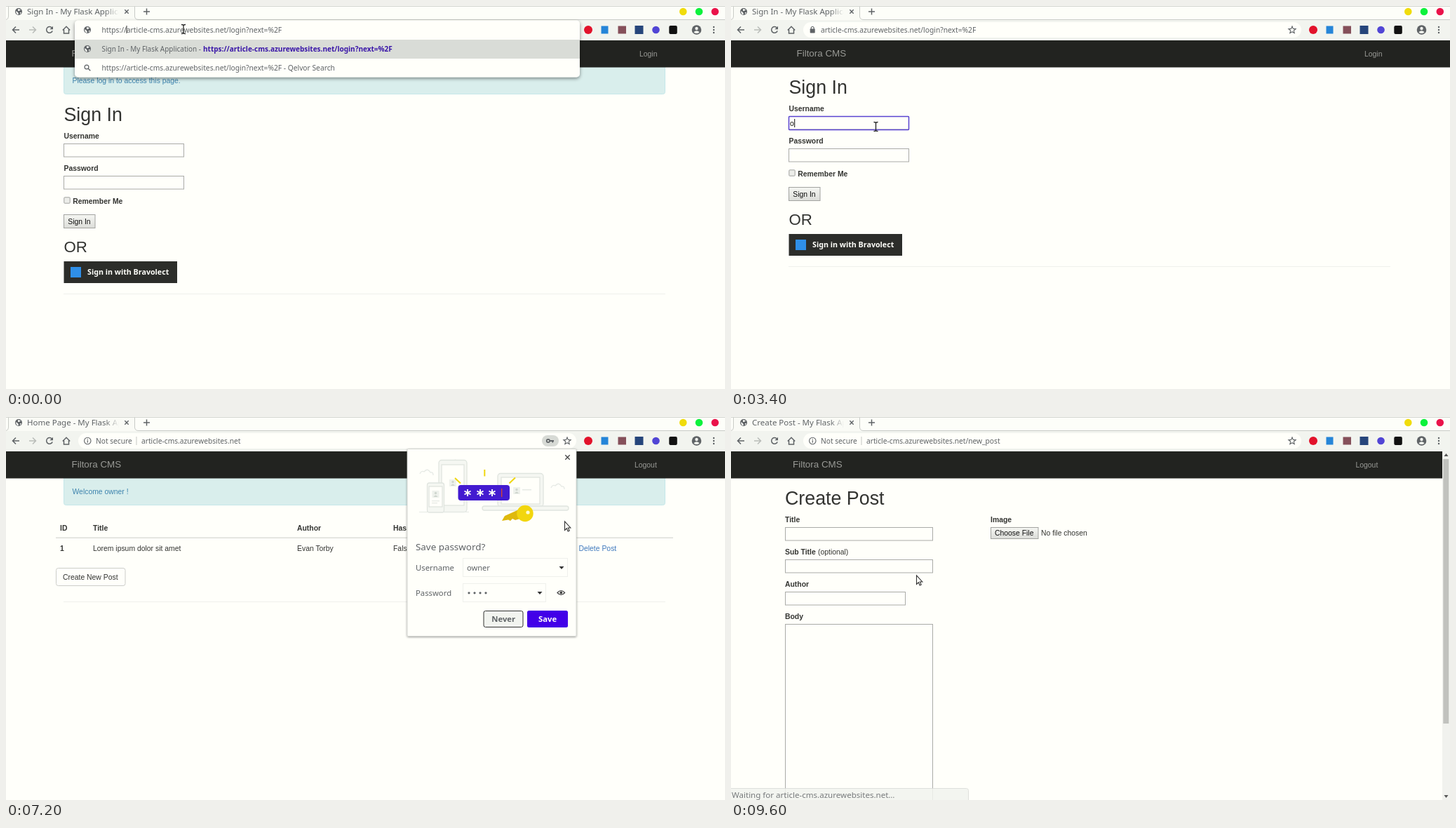
An HTML page for the animation above (9.8 s loop, 1025x546 px).

```html
<!DOCTYPE html>
<html lang="en">
<head>
<meta charset="utf-8">
<title>Browser walkthrough</title>
<style>
  html, body { margin: 0; width: 100%; height: 100%; overflow: hidden; background: #fffffa; }
  svg { display: block; width: 1025px; height: 546px; }
  text { white-space: pre; }
  .page { font-family: "Liberation Sans", Arial, sans-serif; }
  .ui { font-family: "Noto Sans", "Open Sans", sans-serif; }
</style>
</head>
<body>
<svg id="stage" viewBox="0 0 1025 546" xmlns="http://www.w3.org/2000/svg">
  <defs>
    <linearGradient id="fade"><stop offset="0" stop-color="#fafbf6" stop-opacity="0"/><stop offset="1" stop-color="#fafbf6"/></linearGradient>
    <linearGradient id="button" x2="0" y2="1"><stop offset="0" stop-color="#f5f6f2"/><stop offset="1" stop-color="#dcddd9"/></linearGradient>
    <clipPath id="tabClip"><rect x="28" width="133" height="19"/></clipPath>
    <filter id="shadow" x="-10%" y="-10%" width="120%" height="130%"><feDropShadow dx="0" dy="1" stdDeviation="1.8" flood-opacity=".4"/></filter>
    <filter id="deepShadow" x="-10%" y="-20%" width="120%" height="150%"><feDropShadow dx="0" dy="2" stdDeviation="2.8" flood-opacity=".45"/></filter>
  </defs>
  <g id="scene"></g>
</svg>
<script>
const LOOP = 9800, STEP = 200;
const PAPER = '#fffffa', INK = '#333431', GREY = '#5f6366', LINK = '#3f79bd';
const HOST = 'article-cms.azurewebsites.net';
const LOGIN = HOST + '/login?next=%2F';
const BRAND = 'Filtora CMS', USER = 'owner';
const scene = document.getElementById('scene');

const text = (x, y, s, size = 10.4, fill = INK, more = '') =>
  `<text class="page" x="${x}" y="${y}" font-size="${size}" fill="${fill}" ${more}>${s}</text>`;
const bold = (x, y, s) => text(x, y, s, 10.4, INK, 'font-weight="700"');
const ui = (x, y, s, size = 10.2, fill = GREY, more = '') =>
  `<text class="ui" x="${x}" y="${y}" font-size="${size}" fill="${fill}" ${more}>${s}</text>`;
const rect = (x, y, w, h, fill, more = '') =>
  `<rect x="${x}" y="${y}" width="${w}" height="${h}" fill="${fill}" ${more}/>`;
const circle = (x, y, r, fill, more = '') => `<circle cx="${x}" cy="${y}" r="${r}" fill="${fill}" ${more}/>`;
const stroke = (d, color = GREY, w = 1.4, more = '') =>
  `<path d="${d}" fill="none" stroke="${color}" stroke-width="${w}" ${more}/>`;
const fill = (d, color) => `<path d="${d}" fill="${color}"/>`;
const at = (x, y, s) => `<g transform="translate(${x} ${y})">${s}</g>`;
const when = (test, make) => test ? make() : '';

const cross = (x, y, r, color = GREY, w = 1.4) =>
  stroke(`M${x - r} ${y - r}l${2 * r} ${2 * r}m0 ${-2 * r}l${-2 * r} ${2 * r}`, color, w);
const globe = (x, y) => at(x, y, circle(0, 0, 5, GREY) +
  fill('M-4 -1L-1 1L0 4L-2 4Q-4 2 -4 -1ZM-1 -4L3 -3L1 -1L-1 -1ZM2 1L4 1L2 4Z', '#f4f5f1'));
const keyIcon = (x, y) => at(x, y, circle(-2.6, 0, 2.2, 'none', `stroke="${GREY}" stroke-width="1.7"`) +
  stroke('M0 0H5.5M3.8 0V2.6', GREY, 1.8));
const dropArrow = (x, y) => fill(`M${x - 3.5} ${y - 2}h7l-3.5 4z`, '#333');

const input = (x, y, w, h = 19.5) => rect(x + .5, y + .5, w - 1, h - 1, PAPER, 'stroke="#aaaba8"');
const focusRing = y => rect(82.5, y + .5, 171, 19, 'none', 'rx="1" stroke="#5a43d0" stroke-width="1.5"');
const button = (x, y, w, h, label, labelX) =>
  rect(x + .5, y + .5, w - 1, h - 1, 'url(#button)', 'stroke="#a2a3a0"') + text(labelX, y + h / 2 + 3.7, label, 10.4, '#111');
const rule = y => rect(82, y, 858, 1, '#eff0ec');
const caret = (x, y, h = 12) => rect(x, y, 1, h, '#111');

function track(t, keys) {
  let i = 0;
  while (i < keys.length - 2 && t >= keys[i + 1][0]) i++;
  const [a, b] = [keys[i], keys[i + 1]];
  const p = Math.min(1, Math.max(0, (t - a[0]) / (b[0] - a[0])));
  const e = p * p * (3 - 2 * p);
  return [a[1] + (b[1] - a[1]) * e, a[2] + (b[2] - a[2]) * e];
}
const pointerPath = [
  [0, 253, 33], [1400, 253, 33], [2000, 319, 303], [2600, 343, 332], [3000, 206.5, 172], [5000, 206.5, 172],
  [5600, 206, 278], [6400, 206, 278], [7200, 796, 149], [7600, 800, 57], [7800, 800, 57],
  [8400, 140, 226], [8800, 140, 226], [9200, 179, 224], [9600, 264, 226]
];

function pointer(t) {
  const [x, y] = track(t, pointerPath);
  if (t < 1600 || (t >= 3000 && t < 5400))
    return at(x, y, stroke('M-3 -6.5Q0 -6.5 0 -5Q0 -6.5 3 -6.5M0 -5V5M-3 6.5Q0 6.5 0 5Q0 6.5 3 6.5', '#222', 1.3));
  if (t >= 8400 && t < 9400)
    return at(x, y, '<path d="M-1 1Q0 -1 1.2 1V6L6 7Q8 8 7 11L5.5 15H0L-4 9Q-4 7 -1 9Z" fill="#fffffa" stroke="#222" stroke-width="1.1"/>' +
      stroke('M2.5 8V10M4.8 8V10', '#222', .8));
  return at(x, y, '<path d="M.5 0V12.5L3.3 9.8L5.2 14L7.2 13L5.3 9H8.8Z" fill="#fffffa" stroke="#333" stroke-width="1.1"/>');
}

function navbar(action, x, shift = 0) {
  return rect(0, 49, 1025, 38.5, '#222320') + text(93.5 + shift, 72, BRAND, 13.4, '#999a96') +
    text(x + shift, 71.6, action, 10.4, '#999a96');
}

const alertBox = message => rect(82.5, 70, 857, 55.5, '#d9eeec', 'rx="3" stroke="#c5e7e9"') + text(94.5, 110, message, 10.4, '#3d83ad');

function signInPage(t) {
  const withAlert = t < 1200;
  const name = USER.slice(0, [3400, 3600, 3600, 3800, 3800].filter(k => t >= k).length);
  const dots = t >= 4600 ? 4 : t >= 4400 ? 2 : 0;
  const form = text(82.5, 125.3, 'Sign In', 26.8) +
    bold(82.5, 149.7, 'Username') + input(82, 157, 172) + text(84, 171, name, 10.4, '#111') +
    bold(82.5, 195.6, 'Password') + input(82, 203, 172) +
    Array.from({ length: dots }, (_, i) => circle(86 + i * 3.8, 213, 1.45, '#111')).join('') +
    when(t >= 3000 && t < 4000, () => focusRing(157) + caret(84.5 + name.length * 5.7, 161)) +
    when(t >= 4000, () => focusRing(203) + caret(85 + dots * 3.7, 207)) +
    rect(82.8, 233.8, 8.4, 8.4, '#ecede9', 'rx="1" stroke="#a2a3a0"') + bold(95.3, 242.8, 'Remember Me') +
    button(82, 258, 45.5, 20, 'Sign In', 88.3) + text(82.5, 312.4, 'OR', 22.3) +
    rect(82.5, 325, 161.5, 31, '#2c2d2a') + rect(92, 333, 15, 15, '#2f8fe8') +
    ui(116, 344.3, 'Sign in with Bravolect', 10.7, '#fffffa', 'font-weight="600"') + rule(371);
  return (withAlert ? alertBox('Please log in to access this page.') + at(0, 39, form) : form) + navbar('Login', 903);
}

function homePage(t) {
  const hover = t >= 8400;
  return alertBox(`Welcome ${USER} !`) + navbar('Logout', 896) +
    bold(77, 161.8, 'ID') + bold(124, 161.8, 'Title') + bold(415, 161.8, 'Author') + bold(552, 161.8, 'Has Image?') +
    rect(71, 171.5, 880, 1.5, '#dddeda') +
    bold(77, 190.5, '1') + text(124, 190.5, 'Lorem ipsum dolor sit amet') + text(415, 190.5, 'Evan Torby') +
    text(552, 190.5, 'False') + text(701, 190.5, 'Edit Post', 10.4, LINK) + text(816.5, 190.5, 'Delete Post', 10.4, LINK) +
    rect(71.5, 215.5, 98.5, 25, hover ? '#e6e7e3' : PAPER, `rx="3" stroke="${hover ? '#adaeaa' : '#cccdc9'}"`) +
    text(81, 231.8, 'Create New Post') + rule(263);
}

function createPage() {
  return navbar('Logout', 896, -5.5) + text(77, 125.3, 'Create Post', 26.8) +
    bold(77, 149.7, 'Title') + input(77, 157, 211) +
    bold(77, 195.6, 'Sub Title') + text(124, 195.6, '(optional)') + input(77, 203, 211) +
    bold(77, 241.6, 'Author') + input(77, 249, 172) + bold(77, 287.6, 'Body') + input(77, 295, 211, 260) +
    bold(370, 149.7, 'Image') + button(370, 157, 68.5, 17, 'Choose File', 376) + text(442, 169.3, 'No file chosen') +
    rect(1014, 49, 11, 497, '#f1f2ee') + rect(1015.3, 60, 8, 377, '#c1c2be') +
    fill('M1016.5 56h6l-3-4zM1016.5 539h6l-3 4z', '#555');
}

function illustration() {
  const pale = '#e6eae5', line = 'stroke="#e0e5df" stroke-width="1.3"';
  const cloud = (x, y) => stroke(`M${x} ${y}q2 -5 6 -3q5 -6 9 1q4 -1 4 4`, pale, 1.3);
  const person = (x, y) => rect(x - 5, y - 5, 10, 10, '#eef1ec') + circle(x, y - 1.5, 1.7, '#cfd6ce') +
    fill(`M${x - 3} ${y + 4}q3 -5 6 0z`, '#cfd6ce');
  const star = x => stroke(`M${x} 103v10M${x - 4.5} 105.5l9 5m0 -5l-9 5`, '#fffffa', 1.9);
  return cloud(590, 81) + cloud(630, 67) + cloud(777, 101) +
    rect(617, 61.5, 40, 74, '#f5f7f2', `rx="4" ${line}`) + rect(621, 68, 32, 58, PAPER, line) +
    rect(600.5, 94, 24, 42, '#f5f7f2', `rx="3" ${line}`) + rect(603, 99, 19, 29, PAPER, line) +
    person(612.5, 110) + person(637, 94) + rect(607, 119, 11, 1.3, pale) + rect(607, 122, 8, 1.3, pale) +
    rect(701, 80.5, 65, 47, '#f5f7f2', `rx="4" ${line}`) + rect(706, 86, 55, 38, PAPER, line) +
    person(728, 105) + rect(736, 103, 13, 1.5, pale) + rect(679, 127, 123, 6, '#f5f7f2', `rx="3" ${line}`) +
    stroke('M589 135.5H660', pale, 1) +
    stroke('M640 87l8 7.5M682.3 75v9.5M726 86.5l-8.5 8', '#f0d70f', 2) +
    rect(644.5, 97, 73.5, 22, '#431bd0', 'rx="4"') + star(658) + star(676) + star(693) + rect(706, 102, 1.3, 12, '#d8462c') +
    fill('M731 132L711 141L707 148L716 146.5L719 148L722 145L726 147L736 144Z', '#dfb90c') +
    circle(740, 137.5, 11.7, '#f2d60e') + circle(744, 136, 2.6, '#fffbd0');
}

function savePrompt() {
  const field = (y, w) => rect(651.5, y + .5, w, 26, PAPER, 'stroke="#eff0ec"');
  return rect(572, 45.5, 241, 267, PAPER, 'rx="1.5" stroke="#c5c7c3" stroke-width=".7" filter="url(#shadow)"') +
    cross(800.5, 57.5, 3.2, '#444', 1.3) + illustration() +
    ui(584, 190, 'Save password?', 13.4) + ui(584, 219, 'Username', 11.3) + ui(584, 255, 'Password', 11.3) +
    field(201, 149) + ui(657, 219, USER, 11.1) + dropArrow(792, 215) +
    field(237, 118) + [660, 668, 676, 684].map(x => circle(x, 250.8, 1.6, GREY)).join('') + dropArrow(761, 251) +
    stroke('M786 250.5Q791.3 244.5 796.6 250.5Q791.3 256.5 786 250.5Z', '#444', 1.2) + circle(791.3, 250.5, 1.9, '#444') +
    rect(681, 276.5, 56, 23, '#f2f4ef', 'rx="2.5" stroke="#333"') + ui(692.3, 292.3, 'Never', 11.3, GREY, 'font-weight="600"') +
    rect(743, 276, 58, 24, '#4200e8', 'rx="2.5"') + ui(759, 292.3, 'Save', 11.3, '#fffffa', 'font-weight="600"');
}

function tabStrip(t, title, loading) {
  const turn = 90 + .2783 * (t - 6200), length = 165 + 45 * Math.cos((t - 6200) * Math.PI / 600);
  return rect(0, 0, 1025, 20, '#fdfef9') + rect(0, 20, 1025, 29, '#f2f4ef') + rect(0, 0, 1025, 1, '#d4d6d1') +
    fill('M0 20Q4 19 4 15V1H184V15Q184 20 189 20Z', '#fafbf6') +
    stroke('M0 19.5Q3.5 19 3.5 15V1M183.5 1V15Q184 19.5 189 19.5H1025', '#c9cbc7', 1) +
    (loading
      ? `<circle cx="18" cy="8" r="5" fill="none" stroke="${GREY}" stroke-width="1.5" pathLength="360" stroke-dasharray="${length} 360" transform="rotate(${turn} 18 8)"/>`
      : globe(18, 8)) +
    `<g clip-path="url(#tabClip)">${ui(30, 12, title, 11.5)}</g>` + rect(141, 2, 20, 16, 'url(#fade)') +
    cross(172, 8, 2.7) + stroke('M196 8H205M200.5 3.5V12.5', GREY, 1.5) +
    circle(965.3, 8, 5.3, '#f0dc0c') + circle(988, 8, 5.3, '#0cf23c') + circle(1010.8, 8, 5.3, '#ea134a');
}

function toolbar(loading) {
  const arrow = (x, flip, color) =>
    `<g transform="translate(${x} 34) scale(${flip} 1)">${stroke('M5 0H-4M0 -4.5L-4.5 0L0 4.5', color, 1.5)}</g>`;
  return arrow(14, 1, GREY) + arrow(38, -1, '#b9bcb8') +
    (loading ? cross(62, 34, 3.8, GREY, 1.6)
      : stroke('M65.8 31.5A4.4 4.4 0 1 0 66.2 35.5', GREY, 1.5) + fill('M67 28.7V33.3H62.4Z', GREY)) +
    stroke('M80.8 34.5L86 29.3L91.2 34.5M82.5 33.5V39H89.5V33.5', GREY, 1.5) +
    circle(830, 34, 6, '#e2122b') + rect(848.5, 28.5, 10, 11, '#2585d8') + rect(872.5, 28.5, 11.5, 11, '#85505a') +
    rect(896.5, 28, 12, 12, '#26457b') + circle(926.5, 34, 5.3, '#5145d5') + rect(945.3, 28, 11.5, 12, '#111', 'rx="2"') +
    circle(984.5, 34, 6.8, GREY) + circle(984.5, 32, 2.2, '#f2f4ef') + fill('M980.3 37.2Q984.5 33.5 988.7 37.2Q984.5 41 980.3 37.2Z', '#f2f4ef') +
    [30, 34, 38].map(y => circle(1009, y, 1.2, GREY)).join('');
}

function addressBar(t, url, secure) {
  const star = Array.from({ length: 10 }, (_, i) => {
    const a = (i / 5 - .5) * Math.PI, r = i % 2 ? 2.4 : 5.4;
    return `${(800 + r * Math.cos(a)).toFixed(2)} ${(34.3 + r * Math.sin(a)).toFixed(2)}`;
  }).join('L');
  const lock = rect(112.7, 32.5, 7, 6, GREY, 'rx=".8"') + stroke('M114.2 33V31Q116.2 27.5 118.2 31V33', GREY, 1.2);
  const info = circle(116.3, 34, 4.7, 'none', `stroke="${GREY}" stroke-width="1.1"`) + rect(115.7, 33.2, 1.2, 3.5, GREY) + rect(115.7, 31.2, 1.2, 1.2, GREY);
  return rect(103, 23, 710, 22, PAPER, 'rx="11"') +
    (secure ? lock + ui(128, 37.7, url, 10.25)
      : info + ui(128, 37.7, 'Not secure') + rect(185.5, 28, 1, 12, '#c5c7c3') + ui(193, 37.7, url, 10.2)) +
    stroke(`M${star}Z`, GREY, 1.1) +
    when(t >= 6600 && t < 8000, () => rect(764, 26, 24, 16, '#d7dad5', 'rx="8"')) +
    when(t >= 4400 && t < 8800, () => keyIcon(775.5, 34));
}

function suggestions() {
  const full = 'https://' + LOGIN;
  return rect(98, 20.5, 720, 81, PAPER, 'rx="5" filter="url(#deepShadow)"') + rect(98, 48, 720, 27, '#d9dcd7') +
    globe(116, 34) + globe(116, 61) + circle(115, 87, 2.9, 'none', `stroke="${GREY}" stroke-width="1.2"`) + stroke('M117.2 89.2L120.3 92.3') +
    ui(136.5, 37.7, full, 10.25) + rect(171.5, 28, 1, 11, '#333') +
    ui(136.5, 64.8, 'Sign In - My Flask Application - ', 9.95) + ui(281, 64.8, full, 10.02, '#3a17a8', 'font-weight="700"') +
    ui(136.5, 91.8, full + ' - Qelvor Search', 10.25);
}

const statusBubble = (message, opacity) => `<g opacity="${opacity}">` +
  rect(-3, 529.5, 341.5, 20, '#f2f4ef', 'rx="3" stroke="#d9dbd7"') + ui(1, 542.7, message, 11.55) + '</g>';

function draw(t) {
  const between = (a, b) => t >= a && t < b;
  const blank = between(5600, 6400), creating = t >= 9600;
  const pending = between(400, 1200) || between(5000, 5600) || between(8800, 9600);
  const loading = pending || blank;
  const app = ' - My Flask Application';
  const title = pending ? HOST : t < 5600 ? 'Sign In' + app : creating ? 'Create Post' + app : 'Home Page' + app;
  const url = t < 5600 ? LOGIN : t < 8800 ? HOST : HOST + '/new_post';
  const page = t < 5600 ? signInPage(t) : blank ? '' : creating ? createPage() : homePage(t);
  const waiting = between(400, 1600) || between(5200, 5800) || t >= 8800;

  scene.innerHTML = rect(0, 0, 1025, 546, PAPER) + page +
    tabStrip(t, title, loading) + toolbar(loading) +
    (t < 400 ? suggestions() : addressBar(t, url, t < 5600)) +
    when(between(6600, 8000), savePrompt) +
    when(waiting, () => statusBubble(`Waiting for ${HOST}…`, creating ? .85 : 1)) +
    when(between(5800, 6400), () => statusBubble('Waiting for cache…', 1)) +
    pointer(t);
}

let shown = -1;
const start = performance.now();
function tick() {
  const t = Math.floor(((performance.now() - start) % LOOP) / STEP) * STEP;
  if (t !== shown) draw(shown = t);
  requestAnimationFrame(tick);
}
tick();
</script>
</body>
</html>
```
